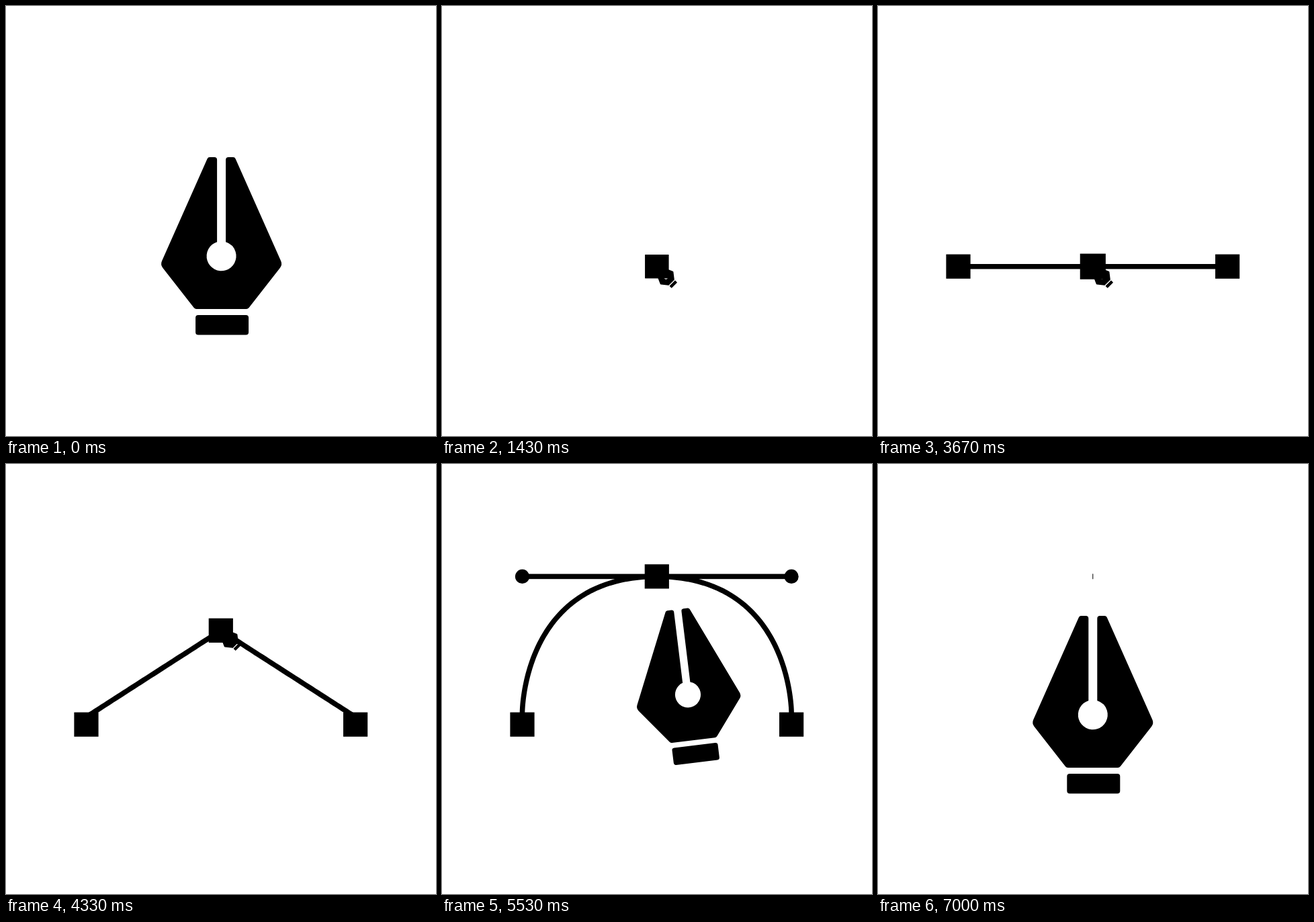
Recreate the animation shown at these times as an HTML page with a canvas. Size 640 by 640 pixels, loop 7.03 s.

```html
<!DOCTYPE html>
<html lang="en">
<head>
<meta charset="utf-8">
<title>Pen tool</title>
<style>
html, body { margin: 0; width: 100%; height: 100%; overflow: hidden; background: #fff; }
canvas { display: block; width: 640px; height: 640px; }
</style>
</head>
<body>
<canvas id="stage" width="640" height="640"></canvas>
<script>
const ctx = document.getElementById('stage').getContext('2d');
const LOOP = 7030, CX = 319.8, BASE = 387.7, RISE = 220.3, REACH = 200.3;

// Progress from time a to b, eased by a bezier with handles (x1, 0) and (x2, 1)
function ease(t, a, b, x1 = 1 / 3, x2 = 2 / 3) {
  const u = (t - a) / (b - a);
  if (u <= 0) return 0;
  if (u >= 1) return 1;
  let lo = 0, hi = 1, s;
  for (let i = 0; i < 24; i++) {
    s = (lo + hi) / 2;
    const x = 3 * (1 - s) * (1 - s) * s * x1 + 3 * (1 - s) * s * s * x2 + s * s * s;
    if (x < u) lo = s; else hi = s;
  }
  return s * s * (3 - 2 * s);
}

function node(x, y, scale) {
  const size = 36.2 * scale;
  ctx.fillRect(x - size / 2, y - size / 2, size, size);
}

function ball(x, y, scale) {
  ctx.beginPath();
  ctx.arc(x, y, 10.6 * scale, 0, Math.PI * 2);
  ctx.fill();
}

// The pen's origin is the middle of its tip
function pen(x, y, scale, degrees) {
  ctx.save();
  ctx.translate(x, y);
  ctx.rotate(-degrees * Math.PI / 180);
  ctx.scale(scale, scale);
  ctx.beginPath();
  ctx.moveTo(-13, 0);
  ctx.arcTo(-6.5, 0, -6.5, 126, 4);
  ctx.lineTo(-6.5, 126.3);
  ctx.arc(0, 147.3, 22, Math.atan2(-21, -6.5), Math.atan2(-21, 6.5), true);
  ctx.arcTo(6.5, 0, 20, 0, 4);
  ctx.arcTo(20, 0, 91, 160, 4);
  ctx.arcTo(91, 160, 39.5, 226, 10);
  ctx.arcTo(39.5, 226, -39.5, 226, 5);
  ctx.arcTo(-39.5, 226, -91, 160, 5);
  ctx.arcTo(-91, 160, -20, 0, 10);
  ctx.arcTo(-20, 0, -6.5, 0, 4);
  ctx.closePath();
  ctx.roundRect(-38.5, 235, 79, 29.5, 4);
  ctx.fill();
  ctx.restore();
}

// Half of the curve, from the outer end to the middle node, whose handle has length arm
function halfCurve(side, spread, foot, top, arm, trim) {
  ctx.beginPath();
  for (let i = 0; i <= 60; i++) {
    const s = trim + (1 - trim) * i / 60, r = 1 - s;
    const start = r * r * (r + 3 * s);
    const x = start * spread + 3 * r * s * s * arm;
    ctx.lineTo(CX + side * x, top + start * (foot - top));
  }
  ctx.stroke();
}

function draw(t) {
  const split = REACH * ease(t, 1832, 2572, 1, 0.1);
  const lift = ease(t, 4000, 4560);
  const arm = REACH * ease(t, 4634, 5334, 0.6, 0.2);
  const trim = ease(t, 6350, 7012);
  const top = BASE - RISE * lift;
  const exit = 1 + 0.13 * ease(t, 5900, 6250) - 1.13 * ease(t, 6250, 6550);
  const pop = (a, b) => (1.055 * ease(t, a, b) - 0.055 * ease(t, b + 20, b + 200)) * exit;

  ctx.fillStyle = '#fff';
  ctx.fillRect(0, 0, 640, 640);
  ctx.fillStyle = ctx.strokeStyle = '#000';
  ctx.lineWidth = 7.6;

  if (split > 0 && trim < 1) {
    // The ends move up to the top edge of the outer nodes
    const foot = BASE - 17.5 * lift;
    for (const side of [-1, 1]) halfCurve(side, split, foot, top, arm, trim);
  }
  if (arm > 0) {
    const line = arm * (1 - trim);
    ctx.fillRect(CX - line, top - 3.8, line * 2, 7.6);
    ball(CX - arm, top, exit);
    ball(CX + arm, top, exit);
  }

  const outer = pop(1200, 1480);
  node(CX - split, BASE, outer);
  node(CX + split, BASE, outer);
  node(CX, top, pop(3250, 3680));

  // Pen: shrink and press, drag out, go back and press, lift, pull the handle
  const back = ease(t, 2540, 3005);
  const x = 320.6 - 2.9 * ease(t, 0, 920) + split * (1 - back) + 199.2 * ease(t, 4550, 5010);
  const y = 225 + 162.7 * ease(t, 0, 920) - 223.5 * lift;
  const scale = 1 - 0.8 * ease(t, 0, 1220) - 0.05 * ease(t, 1220, 1420)
    + 0.05 * (ease(t, 2540, 2900) - ease(t, 3000, 3300));
  const angle = 45 * ease(t, 0, 860);
  // Then everything blends to the large upright pose
  const home = ease(t, 4981, 5911, 0.6, 0.2);
  const mix = (a, b) => a + (b - a) * home;
  pen(mix(x, 319.8), mix(y, 226), mix(scale, 1), mix(angle, 0));
}

function tick() {
  draw(performance.now() % LOOP);
  requestAnimationFrame(tick);
}
tick();
</script>
</body>
</html>
```
